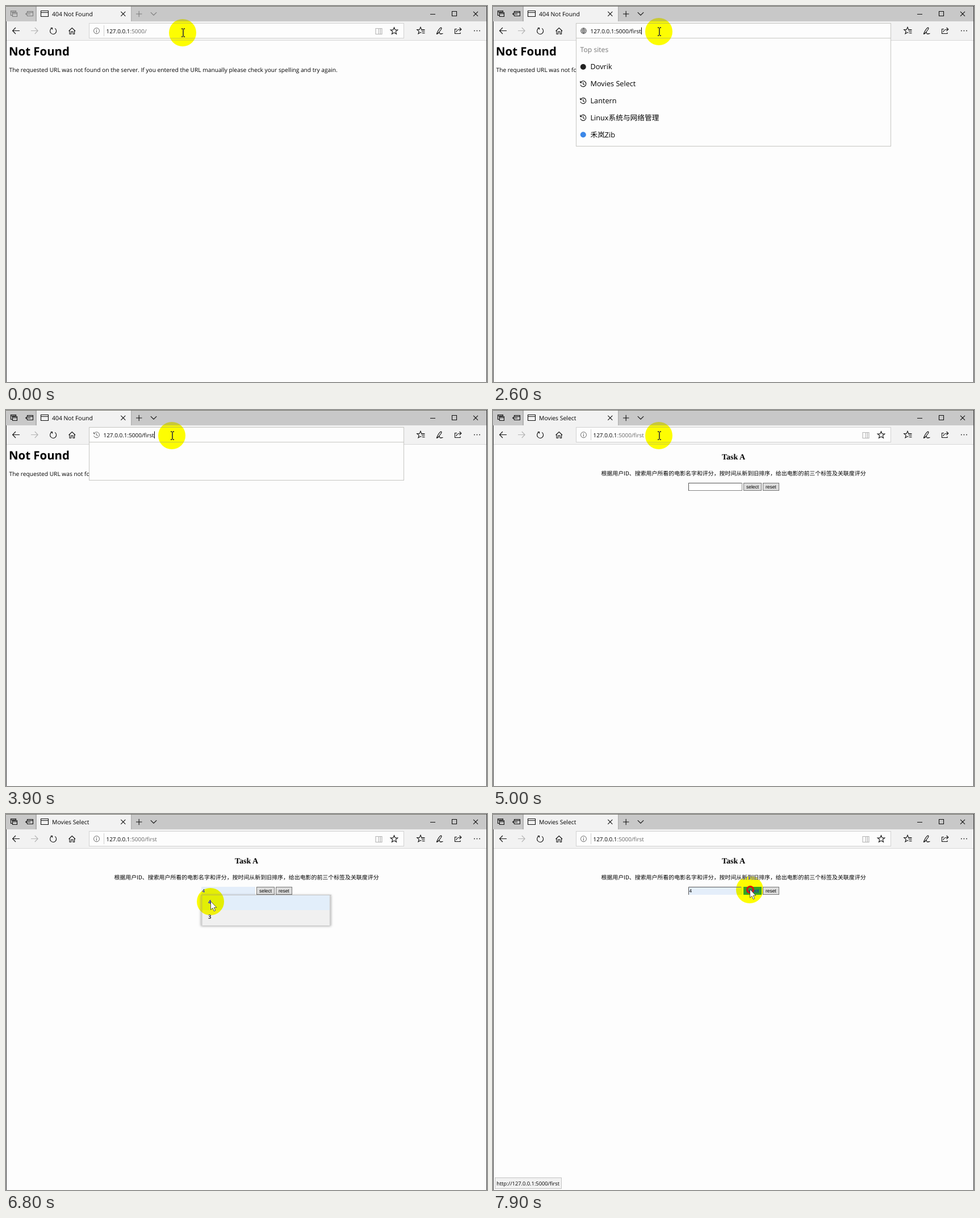
Animation of 847x661 px, one loop 8000 ms. Source, as an HTML page:

```html
<!DOCTYPE html>
<html lang="en">
<head>
<meta charset="utf-8">
<title>Browser session</title>
<style>
html, body { margin: 0; width: 100%; height: 100%; overflow: hidden; background: #fdfdfd; }
#stage { display: block; width: 847px; height: 661px; isolation: isolate; }
text { font-family: "Open Sans", "Noto Sans", "Noto Sans CJK SC", sans-serif; fill: #000; text-rendering: geometricPrecision; white-space: pre; }
.line { fill: none; stroke: #111; stroke-width: 1.1; }
.idle .line { stroke: #7c7c7c; }
.line.off { stroke: #b4b4b4; }
.line.thin { stroke: #666; stroke-width: 1; }
.url { font-size: 9.95px; }
.item { font-size: 12.7px; }
.btn { font: 8.45px "Liberation Sans", Arial, sans-serif; }
.opt { font-size: 9.5px; font-weight: 600; }
#glow { fill: #00f; mix-blend-mode: difference; }
#popup { filter: drop-shadow(0 1px 2px rgba(0,0,0,.35)); }
</style>
</head>
<body>
<svg id="stage" viewBox="0 0 847 661" width="847" height="661">
  <defs>
    <path id="star" d="M0-6.3 1.8-2 6.3-1.9 2.8.9 4 5.3 0 2.8-4 5.3-2.8.9-6.3-1.9-1.8-2z"/>
    <path id="past" d="M-4.6-2A5 5 0 1 1-4.8 1.5M-5-4.8V-1.8H-2M0-2.8V.5L2.4 1.6"/>
    <path id="info" d="M-5 0A5 5 0 1 1 5 0 5 5 0 1 1-5 0M0-.8V3M0-2.8V-1.6"/>
    <path id="globe" d="M-5 0A5 5 0 1 1 5 0 5 5 0 1 1-5 0H5M0-5V5M0-5C-3.2-2-3.2 2 0 5 3.2 2 3.2-2 0-5M-4.2-2.6H4.2M-4.2 2.6H4.2"/>
  </defs>
  <rect width="847" height="661" fill="#fdfdfd"/>

  <g id="missing">
    <text x="5" y="87" font-size="20.4" font-weight="700">Not Found</text>
    <text x="5.5" y="115.8" font-size="10.2">The requested URL was not found on the server. If you entered the URL manually please check your spelling and try again.</text>
  </g>

  <g id="task">
    <text x="423.5" y="86.8" text-anchor="middle" style="font:bold 14px 'Liberation Serif',serif">Task A</text>
    <text x="423.5" y="114.6" text-anchor="middle" lang="zh-CN" style="font:9.93px 'Noto Sans CJK SC',sans-serif">根据用户ID、搜索用户所看的电影名字和评分，按时间从新到旧排序，给出电影的前三个标签及关联度评分</text>
    <rect id="field" x="344.5" y="128.5" width="94" height="13"/>
    <path id="bevel" d="M344.5 142V128.5H437" fill="none" stroke="#555"/>
    <text id="value" class="btn" x="345.5" y="138.2">4</text>
    <path id="fieldCaret" d="M346.5 130.5V139.5" stroke="#000"/>
    <rect id="select" x="441.5" y="128.5" width="31" height="13"/>
    <text class="btn" x="457" y="137.9" text-anchor="middle">select</text>
    <rect x="475.5" y="128.5" width="28" height="13" fill="#ddd" stroke="#777"/>
    <text class="btn" x="489.3" y="137.9" text-anchor="middle">reset</text>
  </g>

  <g id="popup">
    <svg id="popupView" x="343" y="142" width="230" height="54">
      <rect x=".5" width="228.5" height="100%" fill="#f0f0f0"/>
      <g id="popupBody">
        <rect id="hover" x="1" y="1" width="228" height="26" fill="#e2eefa"/>
        <text class="opt" x="13" y="16.4">4</text>
        <text class="opt" x="13" y="42.4">3</text>
      </g>
      <path d="M1.5 0V60M228 0V60" stroke="#cfcfcf" stroke-width="2.4"/>
      <path d="M0 .5H230" stroke="#c4c4c4"/>
    </svg>
  </g>

  <g id="status">
    <rect x="3.5" y="639.5" width="117" height="19" fill="#f2f2f2" stroke="#c3c3c3"/>
    <text x="6.3" y="653" font-size="9.3">http://127.0.0.1:5000/first</text>
  </g>

  <rect width="847" height="27" fill="#c8c8c8"/>
  <rect y="27" width="847" height="33" fill="#f2f2f2"/>
  <rect y="60" width="847" height="1" fill="#d9d9d9"/>
  <rect x="52" y="1" width="2" height="26" fill="#b2b2b2"/>
  <rect x="220" y="1" width="1.5" height="26" fill="#b4b4b4"/>
  <rect x="54" y="1" width="166" height="27" fill="#f2f2f2"/>
  <rect width="847" height="1" fill="#74746c"/>
  <path d="M.5 27V661M846.5 0V661" stroke="#3c3c3c"/>

  <g id="tabTools">
    <path class="line" d="M11 16.5H8.5V8.5H17.5V10.5M8.5 10.5H17.5M11.5 11.5H19.5V18.5H11.5ZM11.5 13.5H19.5"/>
    <path class="line" d="M37.5 12V9.5H47.5V17.5H37.5V16M37.5 11.5H47.5M43 14H34.5M37 11.8 34.7 14 37 16.2"/>
    <path class="line" d="M229 14H239.5M234.2 8.8V19.2M254.8 11.2 260 16.2 265.2 11.2"/>
  </g>
  <path id="favicon" class="line" d="M61.5 8.5H74.5V18.5H61.5ZM61.5 11.5H74.5"/>
  <g id="spinner" fill="#3977b5"></g>
  <text id="title" x="81" y="17.6" font-size="10.4"></text>
  <path class="line" d="M202.3 9.8 210.3 17.8M210.3 9.8 202.3 17.8"/>
  <path class="line" d="M747 14.5H756M785.5 9.5H793.5V17.5H785.5ZM823 9.8 831 17.8M831 9.8 823 17.8"/>

  <path class="line" d="M24 43.5H11.8M17 38 11.6 43.5 17 49"/>
  <path class="line off" d="M44 43.5H56M50.8 38 56.2 43.5 50.8 49"/>
  <path class="line" d="M80.2 39.3A5.5 5.5 0 1 0 86.2 39.4M78.8 38.6H81.6V41.6"/>
  <path class="line" d="M110.6 44 116.3 38.5 122 44M112 43V49.3H114.7V45H118V49.3H120.6V43"/>
  <use href="#star" x="730" y="43.5" class="line"/>
  <path d="M730.5 41.8H738V51H732Z" fill="#f2f2f2"/>
  <path class="line" d="M731 42.2H737.5M732 45H737.5M733 47.8H737.5"/>
  <path class="line" d="M758.2 49.5C759.5 46 763 40 765 38.3 767 37.4 767.6 39.4 766 41.5L760.5 48.5 758.2 49.5C761.5 47.5 763.5 45.3 763.7 47.5 763.8 50.2 766 49 769.5 48.2"/>
  <path class="line" d="M794 40.5H790.5V48.5H800V46.5M793 46C793.2 42.5 796 41 801.5 41M798.6 38 801.8 41 798.6 44.2"/>
  <path d="M824 43.5h1.6m3 0h1.6m3 0h1.6" stroke="#111" stroke-width="1.6"/>

  <rect id="bar" x="146.5" y="30.5" width="554" height="26" fill="#fdfdfd"/>
  <g id="barExtras">
    <path d="M172.5 34V53" stroke="#cfcfcf"/>
    <path class="line off" d="M656.5 40V49.5H651V39.5H655.5L656.5 40.5 657.5 39.5H662V49.5H656.5M659.5 40V49"/>
    <use href="#star" x="683.5" y="44" class="line"/>
  </g>
  <use id="barIcon" class="line thin" x="159.5" y="43.7"/>
  <text id="url" class="url" y="47.5"><tspan id="host"></tspan><tspan id="path"></tspan></text>
  <path id="caret" d="M0 37.5V50" stroke="#000"/>

  <g id="drop">
    <rect id="dropBox" x="146.5" y="56.5" width="554" fill="#fdfdfd" stroke="#c6c6c2"/>
    <g id="sites">
      <text class="item" x="153.5" y="81" style="font-size:12.2px;fill:#777">Top sites</text>
    </g>
  </g>

  <g id="pointer">
    <circle id="glow" r="24"/>
  </g>
  <g id="marks">
    <path id="beam" d="M-2-7H.2M1.8-7H4M1-6.5V6.5M-2 7H.2M1.8 7H4" fill="none" stroke="#10103c" stroke-width="1.4"/>
    <circle id="ring" cx="1" cy="0" r="5.4" fill="none" stroke="#e3120b" stroke-width="3"/>
    <path id="arrow" d="M.5-.5V14.3L3.9 11.2 6.3 16.7 8.7 15.7 6.3 10.4H10.8Z" fill="#fff" stroke="#333" stroke-width=".8"/>
  </g>
</svg>
<script>
const NS = 'http://www.w3.org/2000/svg';
const $ = id => document.getElementById(id);
const set = (id, attrs) => { for (const k in attrs) $(id).setAttribute(k, attrs[k]); };
const show = (id, on) => { $(id).style.display = on ? '' : 'none'; };
const ramp = (t, a, b) => Math.min(1, Math.max(0, (t - a) / (b - a)));
const ease = p => 1 - (1 - p) ** 3;
const add = (parent, tag, attrs) => {
  const el = document.createElementNS(NS, tag);
  for (const k in attrs) el.setAttribute(k, attrs[k]);
  return parent.appendChild(el);
};

const LOOP = 8000, STEP = 100;
const HOST = '127.0.0.1';
const KEYS = [1700, 2200, 2300, 2500, 2600]; // one per letter of "first"
const CLICKS = [[200, 300], [6100, 6200], [7000, 7100], [7800, 8000]];
const TRACK = [[0, 311, 47], [400, 311, 47], [800, 292, 45], [5700, 292, 45], [6100, 363, 131],
  [6500, 363, 131], [6700, 360, 154], [7400, 360, 154], [7700, 457, 131], [7800, 452, 133], [LOOP, 452, 133]];

['Dovrik', 'Movies Select', 'Lantern', 'Linux系统与网络管理', '禾岚Zib'].forEach((name, i) => {
  const y = 107 + i * 29.8;
  if (i === 0 || i === 4) add($('sites'), 'circle', { cx: 158.8, cy: y, r: 5, fill: i ? '#3b87e8' : '#222' });
  else add($('sites'), 'use', { href: '#past', x: 158.8, y, class: 'line' });
  add($('sites'), 'text', { class: 'item', lang: 'zh-CN', x: 171.5, y: y + 4.4 }).textContent = name;
});
for (let i = 0; i < 5; i++) add($('spinner'), 'circle', { r: 1 });

function pointerAt(t) {
  const i = TRACK.findIndex(k => k[0] > t);
  const [t0, x0, y0] = TRACK[i - 1], [t1, x1, y1] = TRACK[i];
  const p = ramp(t, t0, t1), e = p * p * (3 - 2 * p);
  return [x0 + (x1 - x0) * e, y0 + (y1 - y0) * e];
}

function drawBar(t) {
  const focus = t >= 300 && t < 4000;
  const typed = 'first'.slice(0, KEYS.filter(k => t >= k).length);
  set('bar', { stroke: focus ? '#c6c6c2' : '#d2d2d2' });
  show('barExtras', !focus);
  set('barIcon', { href: !focus || t < 1700 ? '#info' : t < 2800 ? '#globe' : '#past' });
  set('url', { x: focus ? 171.5 : 176.5 });
  $('host').textContent = HOST;
  $('path').textContent = ':5000/' + typed;
  $('path').style.fill = focus ? '#000' : '#666';
  show('caret', focus);
  if (focus) set('caret', { transform: `translate(${Math.round(171.5 + $('url').getComputedTextLength()) + .5})` });

  show('drop', focus);
  set('dropBox', { height: t >= 2800 ? 67 : 190 * ease(ramp(t, 200, 800)) });
  show('sites', t < 2800);
  const p = ease(ramp(t, 700, 1300));
  set('sites', { opacity: p, transform: `translate(${16 * (1 - p)})` });
}

function drawTab(t) {
  const loading = t >= 4000 && t < 4800;
  $('tabTools').setAttribute('class', t < 300 ? 'idle' : '');
  $('title').textContent = t < 4800 ? '404 Not Found' : 'Movies Select';
  show('favicon', !loading);
  show('spinner', loading);
  [...$('spinner').children].forEach((dot, i) => {
    const a = t / 160 - i * .55;
    dot.setAttribute('cx', 68 + 5 * Math.cos(a));
    dot.setAttribute('cy', 13.5 + 5 * Math.sin(a));
  });
}

function drawPage(t) {
  const focus = t >= 6200 && t < 6700, filled = t >= 6700, preview = filled && t < 7000;
  show('missing', t < 4800);
  show('task', t >= 4800);
  set('field', {
    fill: filled ? '#e4eefa' : '#fff',
    stroke: filled ? '#e4eefa' : focus ? '#333' : '#858585'
  });
  show('bevel', !preview);
  show('value', filled);
  show('fieldCaret', focus);
  const over = t >= 7700;
  set('select', { fill: over ? '#33a3dc' : '#ddd', stroke: over ? '#33a3dc' : '#777' });
  show('status', over);

  const open = ramp(t, 6200, 6500);
  const h = t < 6300 ? 0 : 22 + 32 * ramp(t, 6300, 6500);
  show('popup', t >= 6300 && t < 7400);
  set('popup', { opacity: open ** 1.7 * (1 - ramp(t, 7100, 7400)) });
  set('popupView', { height: h });
  set('popupBody', { transform: `translate(0 ${h - 54})` });
  show('hover', filled);
}

function drawPointer(t) {
  const [x, y] = pointerAt(t), arrow = y > 142 || t >= 7600;
  set('glow', { cx: x, cy: y });
  set('marks', { transform: `translate(${x} ${y})` });
  show('beam', !arrow);
  show('arrow', arrow);
  show('ring', CLICKS.some(([a, b]) => t >= a && t < b));
}

function frame() {
  const now = performance.now() % LOOP;
  const t = Math.floor(now / STEP) * STEP;
  drawPage(t);
  drawTab(t);
  drawBar(t);
  drawPointer(t);
  requestAnimationFrame(frame);
}
frame();
</script>
</body>
</html>
```
